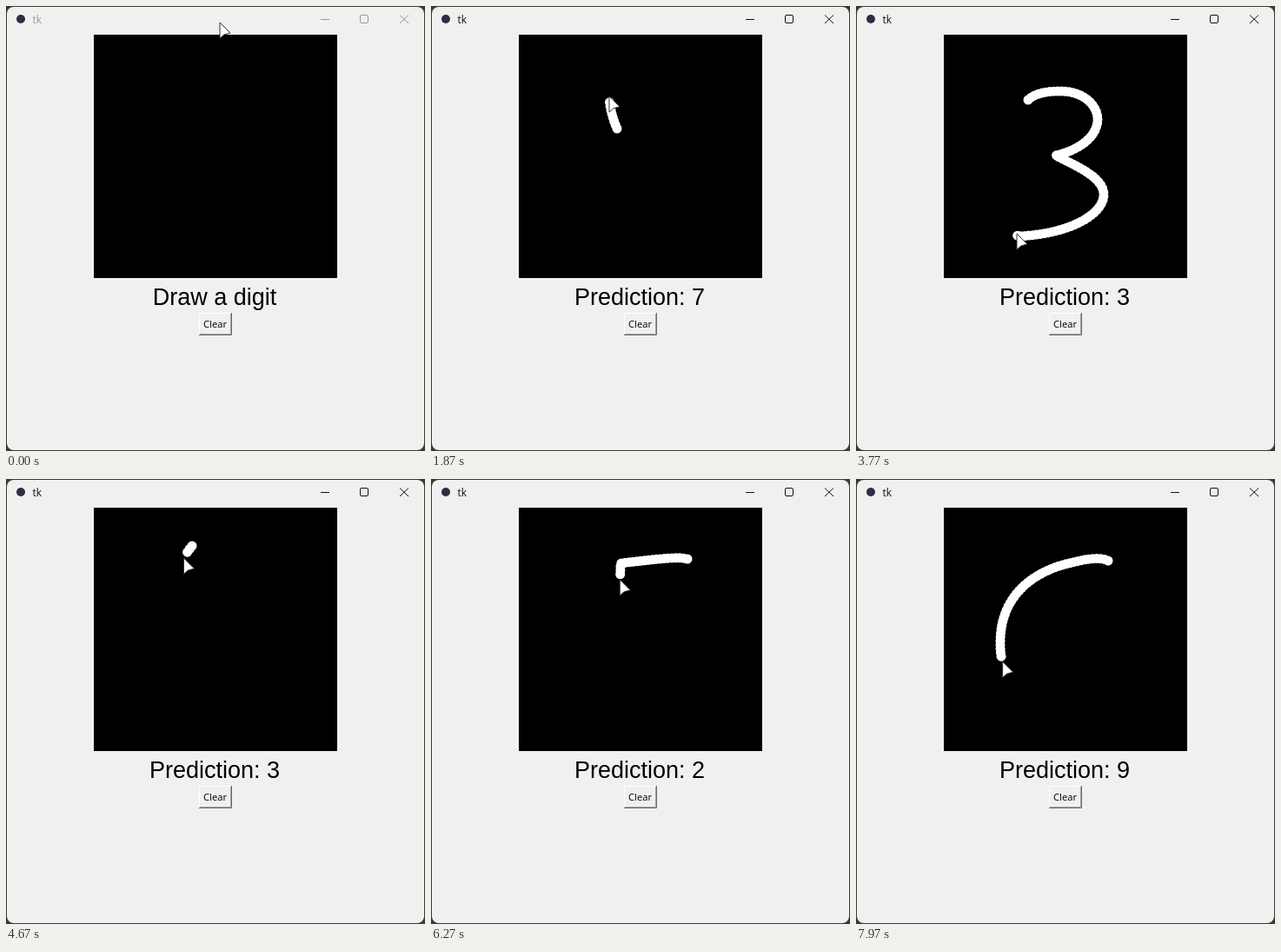
Write an HTML page that moves like this. It is 482 px wide and 512 px high and loops after 8 s.

```html
<!DOCTYPE html>
<html lang="en">
<head>
<meta charset="utf-8">
<title>tk</title>
<style>
  html, body { margin: 0; width: 100%; height: 100%; overflow: hidden; background: #3a3a34; }
  svg { display: block; width: 482px; height: 512px; }
  .ui { font-family: "Open Sans", "Noto Sans", sans-serif; }
  #label { font: 27px "Liberation Sans", Arial, sans-serif; text-anchor: middle; }
  #chrome { color: #111; }
  #chrome.idle { color: #989898; }
</style>
</head>
<body>
<svg viewBox="0 0 482 512">
  <rect x="1" y="1" width="480" height="510" rx="8" fill="#f0f0f0"/>
  <circle cx="17" cy="15" r="5" fill="#2b3040"/>
  <g id="chrome" class="idle" fill="none" stroke="currentColor">
    <text class="ui" x="30.5" y="20" font-size="12" fill="currentColor" stroke="none">tk</text>
    <path d="M362 15.5H372"/>
    <rect x="407.5" y="10.5" width="9" height="9" rx="1.5"/>
    <path d="M453 10.5L463 20M463 10.5L453 20"/>
  </g>
  <rect x="101" y="33" width="280" height="280"/>
  <g id="ink" fill="#fff"></g>
  <text id="label" x="240" y="344">Draw a digit</text>
  <g fill="none">
    <path d="M222.5 379V353.5H259" stroke="#fff"/>
    <path d="M223 377.5H258.5V354" stroke="#a0a0a0"/>
    <path d="M222 378.5H259.5V353" stroke="#696969"/>
  </g>
  <text class="ui" x="227" y="370" font-size="11.2">Clear</text>
  <path id="cursor" d="M0 0V18.3L4.8 14 12 12Z" fill="#fff" stroke="#333" stroke-linejoin="round"/>
</svg>
<script>
const LOOP = 8000, STEP = 4.5, LAG = 6, NS = "http://www.w3.org/2000/svg";
const $ = id => document.getElementById(id);
const ease = p => p * p * (3 - 2 * p);
const svgNode = (name, attrs) => {
  const node = document.createElementNS(NS, name);
  for (const key in attrs) node.setAttribute(key, attrs[key]);
  return node;
};

// ready: pointer arrives; start..end: drawing; over..clear: pointer rests on the button
const strokes = [
  { d: "M262 78C257 130 249 200 243 252",
    ready: 480, start: 520, end: 880, over: 1110, clear: 1330, button: [240, 366] },
  { d: "M214 141C209 130 205 115 205 103C206 85 222 74 240 74C260 74 270 87 270 106C270 125 256 142 240 156M234 163C212 182 180 212 175 235C175 243 183 242 194 239C220 234 250 237 275 244",
    ready: 1690, start: 1750, end: 2380, over: 2570, clear: 2830, button: [238, 369] },
  { d: "M198 108C205 101 218 98 235 98C262 98 278 114 278 131C277 152 255 166 230 172C250 183 285 196 285 217C285 238 250 262 186 265L185 262",
    ready: 3110, start: 3160, end: 3770, over: 4030, clear: 4220, button: [240, 367] },
  { d: "M214 77C202 91 194 112 194 133C196 150 212 169 231 170C242 170 247 166 250 159C247 170 250 215 256 259",
    ready: 4530, start: 4580, end: 5140, over: 5440, clear: 5590, button: [241, 361] },
  { d: "M295 92C285 89 260 92 218 97C218 118 215 135 214 152C240 144 282 158 282 190C281 222 245 240 204 246",
    ready: 5830, start: 6100, end: 6575, over: 6730, clear: 7000, button: [240, 367] },
  { d: "M290 94C280 89 265 92 245 97C210 105 165 130 166 190C166 200 167 206 169 211L172 216C182 246 240 270 258 240C272 210 240 190 205 214",
    ready: 7400, start: 7540, end: 8400, over: 8700, clear: 9000, button: [240, 367] }
];

const labels = [
  [0, "Draw a digit"], [590, "Prediction: 1"], [1820, "Prediction: 7"], [2120, "Prediction: 2"],
  [3270, "Prediction: 7"], [3500, "Prediction: 3"], [4840, "Prediction: 4"],
  [6190, "Prediction: 2"], [6460, "Prediction: 5"], [7730, "Prediction: 9"]
];

const pointer = [[0, 246, 19]];
for (const s of strokes) {
  s.path = svgNode("path", { d: s.d });
  s.length = s.path.getTotalLength();
  s.drawnAt = t => s.length * ease(Math.min(1, Math.max(0, (t - s.start) / (s.end - s.start))));
  s.dots = [];
  for (let at = 0; at <= s.length; at += STEP) {
    const p = s.path.getPointAtLength(at);
    s.dots.push($("ink").appendChild(svgNode("circle", { cx: p.x, cy: p.y, r: 5.5 })));
  }
  const first = s.path.getPointAtLength(0), last = s.path.getPointAtLength(s.length);
  pointer.push([s.ready, first.x, first.y], [s.start, first.x, first.y],
    [s.end, last.x, last.y], [s.over, ...s.button], [s.clear, ...s.button]);
}

function pointerAt(t) {
  const s = strokes.find(s => t >= s.start && t < s.end);
  if (s) {
    const p = s.path.getPointAtLength(s.drawnAt(t));
    return [p.x, p.y];
  }
  const next = pointer.findIndex(key => key[0] > t);
  const [t0, x0, y0] = pointer[next - 1], [t1, x1, y1] = pointer[next];
  const e = ease((t - t0) / (t1 - t0));
  return [x0 + (x1 - x0) * e, y0 + (y1 - y0) * e];
}

function render(t) {
  for (const s of strokes) {
    const drawn = t >= s.end ? s.length : s.drawnAt(t) - LAG;
    const shown = t >= s.start && t < s.clear;
    s.dots.forEach((dot, i) => dot.style.display = shown && i * STEP <= drawn ? "" : "none");
  }
  $("label").textContent = labels.filter(([at]) => at <= t).pop()[1];
  $("chrome").setAttribute("class", t < strokes[0].start ? "idle" : "");
  $("cursor").setAttribute("transform", `translate(${pointerAt(t)})`);
}

const origin = performance.now();
function frame() {
  render(Math.max(0, performance.now() - origin) % LOOP);
  requestAnimationFrame(frame);
}
frame();
</script>
</body>
</html>
```
